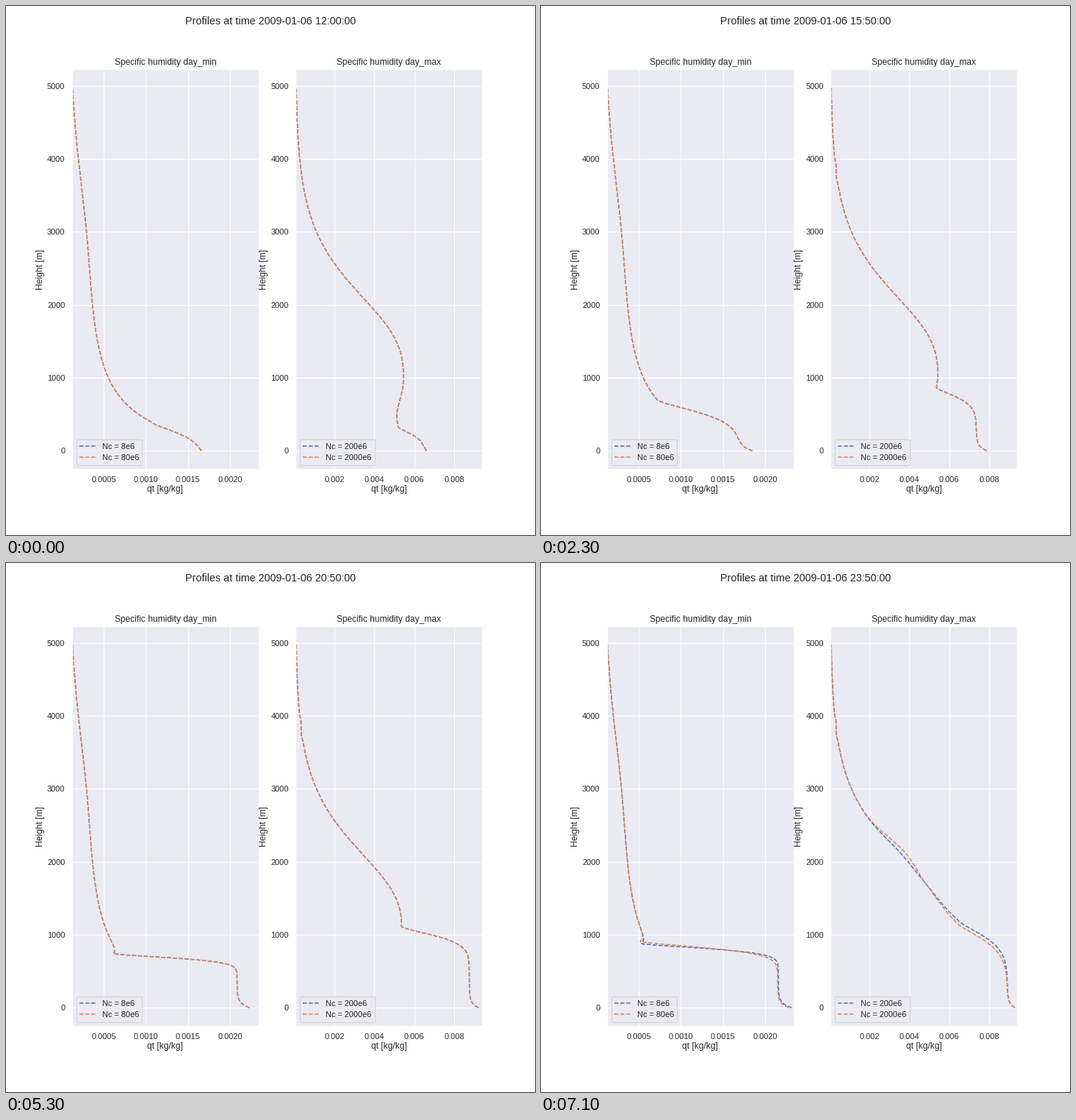
These frames come from a looping animation (720 by 720 pixels, 7.2 s). A matplotlib script:

```python
import numpy as np
import matplotlib.pyplot as plt
from matplotlib.animation import FuncAnimation

BLUE, ORANGE, INK, PANEL = "#4C72B0", "#DD8452", "0.15", "#EAEAF2"
FRAMES, INTERVAL = 72, 100
SIZE, DPI = 720, 72
HEIGHT = np.linspace(0, 4.975, 800)  # km

plt.rcParams.update({
    "font.family": "Liberation Sans", "font.size": 12,
    "figure.facecolor": "white", "figure.dpi": DPI, "savefig.dpi": DPI,
    "axes.facecolor": PANEL, "axes.edgecolor": "white", "axes.linewidth": 1.25,
    "axes.grid": True, "axes.axisbelow": True,
    "axes.titlesize": 12, "axes.labelsize": 12, "axes.labelcolor": INK,
    "axes.labelpad": 3,
    "grid.color": "white", "grid.linestyle": "-", "grid.linewidth": 1,
    "text.color": INK, "xtick.color": INK, "ytick.color": INK,
    "xtick.labelsize": 11, "ytick.labelsize": 11,
    "xtick.major.size": 6, "ytick.major.size": 6,
    "xtick.bottom": False, "ytick.left": False,
    "legend.fontsize": 11, "lines.linewidth": 1.5,
})


def bump(z, center, width):
    return np.exp(-((z - center) / width) ** 2)


def ramp(frame, start, end):
    return np.clip((frame - start) / (end - start), 0, 1)


# Undisturbed air, humidity in g/kg against height in km.
def dry_air(z):
    return (0.5288 - 0.0807 * z + 1.664 * np.exp(-2.77 * z)
            + 0.0087 * np.cos(2.5 * (z - 3)))


def moist_air(z):
    step = 1 - np.exp(-np.exp((2.08 - z) / 0.6))
    return 0.046 + 5.446 * step - 0.368 * bump(z, 0.47, 0.3)


class Day:
    """A well mixed layer that grows into undisturbed air."""

    times = [0, 16, 23, 33, 45, 60, 71]

    def __init__(self, air, fade, wisp, **keys):
        self.air, self.fade, self.wisp, self.keys = air, fade, wisp, keys

    def profile(self, frame, drift):
        late = ramp(frame, 45, 71) ** 3
        top, depth, mixed, skin, dip, plume = (
            np.interp(frame, self.times, self.keys[name])
            + late * drift.get(name, 0)
            for name in ("top", "depth", "mixed", "skin", "dip", "plume"))

        # Air above the layer, held at its lowest value below the top.
        z = np.maximum(HEIGHT, top)
        above = self.air(z) - dip * np.exp((top - z) / self.fade)
        above += plume * bump(z, 2.15, 0.3)
        u = (z - 3.83) / 0.13
        above += self.wisp * ramp(frame, 18, 23) * u * np.exp(-u ** 4)

        blend = np.exp(-((z - HEIGHT) / depth) ** 1.5)
        return (mixed + (above - mixed) * blend
                + skin * np.exp(-HEIGHT / 0.06))


dry = Day(dry_air, fade=0.05, wisp=0,
          top=[0.386, 0.678, 0.698, 0.703, 0.708, 0.768, 0.879],
          depth=[0.181, 0.277, 0.221, 0.161, 0.094, 0.063, 0.091],
          mixed=[1.659, 1.659, 1.694, 1.859, 2.016, 2.138, 2.156],
          skin=[0.026, 0.105, 0.157, 0.157, 0.148, 0.148, 0.157],
          dip=[0, 0, 0, 0, 0.044, 0.105, 0.078],
          plume=[0] * 7)
moist = Day(moist_air, fade=0.25, wisp=0.066,
            top=[0.325, 0.758, 0.869, 0.904, 0.990, 1.221, 1.210],
            depth=[0.126, 0.131, 0.171, 0.111, 0.101, 0.221, 0.282],
            mixed=[6.490, 6.821, 7.355, 7.980, 8.551, 8.937, 8.919],
            skin=[0.147, 0.478, 0.515, 0.644, 0.515, 0.423, 0.368],
            dip=[0, 0.04, 0.07, 0.07, 0.11, 0.07, -1.0],
            plume=[0] * 6 + [0.18])

# How the second run of each day departs from the first by midnight.
DRY_DRIFT = dict(top=0.03, depth=0.028, mixed=-0.009, skin=-0.026)
MOIST_DRIFT = dict(top=-0.03, depth=0.02, dip=0.1, plume=0.26)

fig, axes = plt.subplots(1, 2, figsize=(SIZE / DPI, SIZE / DPI))
fig.subplots_adjust(left=0.125, right=0.9, bottom=0.125, top=0.88, wspace=0.2)
heading = fig.suptitle("", fontsize=14.4)
series = []


def add_panel(ax, title, x_lim, ticks, tick_format, day, drift, labels):
    ax.set(title=title, xlabel="qt [kg/kg]", ylabel="Height [m]",
           xlim=x_lim, ylim=(-248.75, 5223.75))
    ax.set_xticks(ticks, [tick_format.format(t) for t in ticks])
    ax.set_yticks(range(0, 5001, 1000))
    for label, color, change in zip(labels, (BLUE, ORANGE), ({}, drift)):
        line, = ax.plot([], [], "--", color=color, label=label)
        series.append((line, day, change))
    ax.legend(loc="lower left", facecolor=PANEL, edgecolor="0.8",
              framealpha=0.8)


add_panel(axes[0], "Specific humidity day_min", (0.0001254, 0.002335),
          [0.0005, 0.0010, 0.0015, 0.0020], "{:.4f}",
          dry, DRY_DRIFT, ["Nc = 8e6", "Nc = 80e6"])
add_panel(axes[1], "Specific humidity day_max", (0.0000644, 0.009397),
          [0.002, 0.004, 0.006, 0.008], "{:.3f}",
          moist, MOIST_DRIFT, ["Nc = 200e6", "Nc = 2000e6"])


def draw(frame):
    hour, minute = divmod(12 * 60 + 10 * frame, 60)
    heading.set_text(f"Profiles at time 2009-01-06 {hour:02d}:{minute:02d}:00")
    for line, day, drift in series:
        line.set_data(day.profile(frame, drift) / 1000, HEIGHT * 1000)
    return [heading] + [line for line, *_ in series]


anim = FuncAnimation(fig, draw, frames=FRAMES, interval=INTERVAL,
                     repeat=True, repeat_delay=0, blit=False)
plt.show()
```
